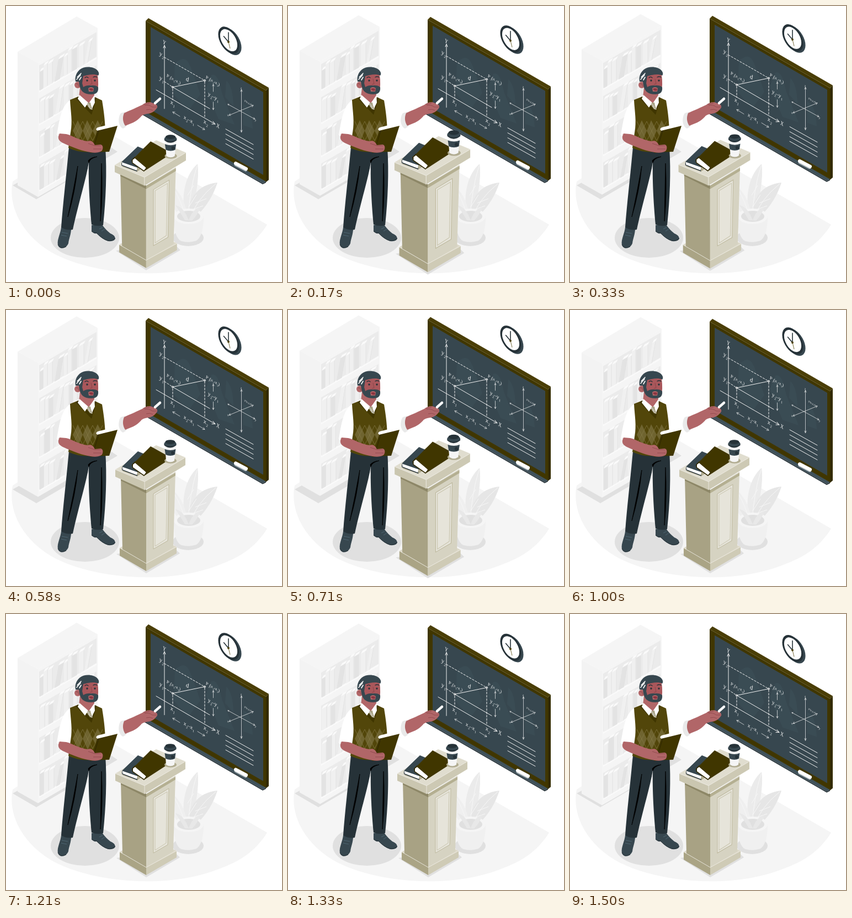
Animation of 500 by 500 pixels, one loop 1.54 s. Source, as an HTML page:

```html
<!DOCTYPE html>
<html lang="en">
<head>
<meta charset="utf-8">
<title>Geometry lesson</title>
<style>
  html, body { margin: 0; width: 100%; height: 100%; overflow: hidden; background: #fff; }
  svg { display: block; width: 100vw; height: 100vh; }
  .chalk { fill: none; stroke: #f2f2f2; stroke-width: 1; stroke-linecap: round; stroke-linejoin: round; }
  .dash { stroke-dasharray: 3.5 2.5; }
  .thin { stroke-width: .7; }
  .label { fill: #f5f5f5; font-family: "Liberation Serif", "Noto Serif", serif; font-style: italic; }
</style>
</head>
<body>
<svg viewBox="0 0 500 500">
  <!-- floor and soft shadows -->
  <path fill="#f5f5f5" d="M473 396 165 218 12 318C3 364 30 415 82 446 150 485 290 501 388 461 430 446 456 424 473 396Z"/>
  <path fill="#e0e0e0" d="M12 325 55 350 202 264 166 240Z"/>
  <ellipse cx="143" cy="420" rx="62" ry="36" fill="#e0e0e0"/>
  <ellipse cx="330" cy="420" rx="28" ry="15" fill="#e0e0e0"/>

  <g class="float">
    <path fill="#f5f5f5" d="M21 83 128 19 166 40 58 103Z"/>
    <path fill="#f3f3f3" d="M21 83 58 103V346L21 325Z"/>
    <path fill="#f5f5f5" d="M58 103 166 40V283L58 346Z"/>
    <g id="shelf" transform="matrix(1 -.583 0 1 58 103)"></g>
  </g>

  <!-- plant -->
  <g fill="#ebebeb">
    <path d="M326 385C315 345 325 305 347 286 351 310 343 355 333 385Z"/>
    <path fill="#e6e6e6" d="M329 388C328 350 347 323 383 320 374 347 362 365 338 388Z"/>
    <path fill="#efefef" d="M322 388C303 372 292 346 302 326 319 341 329 365 328 388Z"/>
    <path fill="none" stroke="#f7f7f7" d="M330 385Q333 330 346 290M332 387Q345 350 380 322M326 386Q319 355 303 330M329 343 340 325M331 364 345 342M343 357 363 349M337 369 357 362"/>
    <path fill="#f0f0f0" d="M304 381C303 405 309 423 318 426Q331 430 345 425C354 419 358 402 358 381Z"/>
    <ellipse cx="331" cy="381" rx="27" ry="14" fill="#f5f5f5"/>
    <ellipse cx="331" cy="381" rx="21" ry="10" fill="#e0e0e0"/>
    <path fill="#e8e8e8" d="M324 388Q313 370 307 361 322 364 331 388Q337 369 352 364 348 378 337 389Z"/>
  </g>

  <g class="float">
    <!-- blackboard -->
    <path fill="#4a3e06" d="M253 27 258 22 476 148 471 153Z"/>
    <path fill="#332b00" d="M471 153 476 148V315L471 319Z"/>
    <path fill="#403600" d="M253 27 471 153V319L253 193Z"/>
    <path fill="#37474f" d="M262 38 466 156V306L262 188Z"/>
    <g fill="#455a64" opacity=".28">
      <path d="M306 104C325 88 330 98 338 120L352 160 330 190 304 160Z"/>
      <path d="M372 125C383 121 387 140 392 160L414 215 385 205 362 150Z"/>
      <path d="M399 135Q411 145 412 181L397 165ZM430 178Q444 180 447 222L430 216Z"/>
    </g>
    <path fill="#3f515a" d="M247 195 253 192 471 318 465 321Z"/>
    <path fill="#263238" d="M247 195 465 321 471 318V320L465 323 247 197Z"/>
    <path stroke="#b8c0c4" stroke-width="7" stroke-linecap="round" d="M417 287 434 296"/>
    <path stroke="#fff" stroke-width="6" stroke-linecap="round" d="M416 285 435 295"/>

    <g class="chalk">
      <path d="M287 186V72M285 76 287 71 289 76M272 152 379 214M375 209 379 214 373 214M302 147 360 135M302 147 369 186"/>
      <path class="dash" d="M287 93 360 135M287 137 302 147M302 150V170M360 137V202"/>
      <circle cx="302" cy="147" r="1.6"/><circle cx="360" cy="135" r="1.6"/>
      <path class="thin" d="M375.500 155V142M374 145 375.500 142 377 145M375.500 174V188M374 185 375.500 188 377 185M315 200 302 192M304 195.500 302 192 306 192M347 216 360 224M356 224 360 224 358 220.500"/>
      <path class="thin" d="M426.500 152V228M425 155 426.500 151 428 155M425 225 426.500 229 428 225M402 178 451 205M404 178 402 178 403 180M449 202 451 205 448 205M404 198 448 180M406 195 404 198 407 198M445 179.500 448 180 446 183"/>
      <path d="M398 223 448 251M398 232 448 260M398 241 448 269M398 249.500 448 277.500"/>
    </g>
    <g id="labels" class="label"></g>

    <!-- clock -->
    <g id="clock">
      <g transform="matrix(.866 .5 0 1 407.500 64.500)"><circle r="22" fill="#37474f"/></g>
      <g transform="matrix(.866 .5 0 1 403.500 62)"><circle r="22" fill="#263238"/><circle r="18" fill="#fff"/></g>
      <path fill="none" stroke="#263238" stroke-width="1.600" stroke-linecap="round" d="M403 48V65L394.500 55"/>
      <path stroke="#52460a" stroke-width=".8" d="M403 65 406 77"/>
      <circle cx="403" cy="65" r="2" fill="#52460a"/>
    </g>
  </g>

  <!-- teacher -->
  <g id="teacher">
    <path fill="#37474f" d="M100 401C99 412 92 423 94 433 97 442 109 440 113 430 114 421 118 414 118 403ZM155 397V408Q159 413 164 412 175 423 185 426 197 427 198 421 197 415 189 412 180 405 174 396Z"/>
    <path fill="none" stroke="#263238" d="M94 432Q98 441 109 436M155 408Q159 412 164 411 174 422 184 425 193 426 198 421"/>
    <path fill="none" stroke="#546e7a" stroke-width=".8" d="M101 410 112 412M100 415 110 417M169 404 175 401M173 408 179 404"/>
    <path fill="#263238" d="M114 256C109 310 103 360 100 401Q110 407 121 405C132 355 146 310 150 283 149 320 152 365 155 396Q166 400 176 397C181 350 183 300 180 256Z"/>
    <path d="M130 290Q126 335 112 382 122 335 130 290ZM173 285Q176 340 171 390 172 335 173 285ZM150 284Q152 276 165 273 154 274 149 280Z" stroke="#000" stroke-width=".8"/>
    <path fill="#fff" d="M168 166C185 174 196 191 207 197L215 219C199 224 184 207 177 194Z"/>
    <path fill="#e9e9e9" d="M208 194C202 203 203 218 212 222 218 219 222 214 221 210L216 192Z"/>
    <path fill="#b16668" d="M214 194C227 188 237 184 247 179 253 174 262 173 266 176 272 177 275 180 274 184 270 190 267 192 262 194 256 196 248 195 244 201 236 210 226 213 216 217 211 209 211 201 214 194Z"/>
    <path fill="none" stroke="#8b4549" stroke-width=".8" d="M251 180Q259 178 265 183L273 183M254 188Q261 186 266 189M249 178 260 176"/>
    <path stroke="#fff" stroke-width="4.500" stroke-linecap="round" d="M270 176 279 168"/>

    <path fill="#fff" d="M134 161 120 168C103 177 98 195 92 234Q104 243 126 240L177 211 163 165Z"/>
    <path fill="none" stroke="#e0e0e0" d="M120 184Q121 206 116 235M94 232Q105 239 119 235"/>
    <path fill="#52460a" d="M131 164 116 170C117 191 121 209 117 230L113 257Q142 271 178 259C183 225 177 190 174 171L161 165 156 189Z"/>
    <path fill="#403600" d="M131 164 126 167 155 197 164 167 161 165 156 188Z"/>
    <g fill="#6f6430">
      <path d="M130 207 139 226 131 245 121 226ZM147 207 157 226 148 246 139 226ZM166 207 176 226 167 245 157 226Z"/>
      <path fill="none" stroke="#857a48" stroke-width=".7" d="M121 209 139 244 157 209 175 243M121 243 139 209 157 244 175 209"/>
    </g>
    <path fill="#b16668" d="M134 148 132 165 149 179 160 162 159 154Z"/>
    <path fill="#fff" d="M133 161 130 168 143 184 149 175ZM160 162 161 175 155 187 150 176Z"/>
    <path fill="#a8a284" d="M148 175 153 175 154 180 157 188 152 187 147 180Z"/>
    <path stroke="#e0e0e0" d="M148 177 153 183M149 181 155 187"/>

    <path fill="#a9575b" d="M134 123Q141 115 158 116 167 119 167 137 168 157 158 160 139 159 134 146Z"/>
    <circle cx="130" cy="143" r="6" fill="#b16668"/>
    <path fill="none" stroke="#8b4549" d="M127 141Q132 140 132 146"/>
    <path fill="#37474f" d="M126 137C124 127 129 119 134 115 143 108 159 110 165 116 169 120 169 124 167 126 159 122 148 125 140 127L138 140 140 147Q146 143 154 144 162 143 167 147C168 157 163 160 154 160 142 160 135 155 133 143L132 137Z"/>
    <path fill="none" stroke="#f5f5f5" stroke-width="1.700" stroke-linecap="round" d="M128 133 135 125M129 129 136 122M133 134 136 129"/>
    <path fill="#b16668" d="M149 149Q154 145 159 149L158 155H150Z"/>
    <path fill="#8b3440" d="M150 150Q154 148 158 150L157 154 152 153Z"/>
    <path fill="none" stroke="#263238" stroke-width="1.300" stroke-linecap="round" d="M143 130Q146 127 149 130M158 129Q161 127 165 129"/>
    <path fill="none" stroke="#8b4549" d="M154 132 156 141 152 142"/>
    <circle cx="147" cy="135" r="1.700" fill="#263238"/><circle cx="161" cy="135" r="1.700" fill="#263238"/>

    <path fill="#fff" d="M163 223 166 220 194 213 197 218 166 227Z"/>
    <path fill="#403600" d="M165 226 202 217 187 264Q170 264 152 266Z"/>
    <path fill="none" stroke="#2e2600" d="M168 226 156 265"/>
    <path fill="#b16668" d="M97 231C92 240 96 245 105 249 123 257 139 263 153 265 161 267 171 265 174 262 177 256 175 251 171 251L161 252C158 245 153 243 148 245 134 244 119 234 109 232Z"/>
    <path fill="none" stroke="#8b4549" stroke-width=".8" d="M149 249 161 253 172 253M158 259H173"/>
  </g>

  <g id="podium">
    <path fill="#e0e0e0" d="M200 442 254 477 315 441 300 426Z"/>
    <path fill="#ddd9c9" d="M206 431 254 403 309 429 254 459Z"/>
    <path fill="#aaa485" d="M206 431 254 459V473L206 445Z"/>
    <path fill="#cfcbb6" d="M254 459 309 429V441L254 473Z"/>
    <path fill="#a8a284" d="M208 302 254 326V459L211 434Z"/>
    <path fill="#d6d3c2" d="M254 326 307 293 303 430 254 459Z"/>
    <path fill="#e6e4da" stroke="#bdb89d" d="M267 333 295 316 293 418 267 433Z"/>
    <path fill="none" stroke="#c8c4ad" d="M270 335 292 322 290 415 270 428Z"/>
    <path fill="#8d8767" d="M208 306 254 326V332L208 309Z"/>
    <path fill="#b4af91" d="M254 326 307 295V300L254 332Z"/>
    <path fill="#e0ddcf" d="M198 289 272 245 325 267 251 311Z"/>
    <path fill="#cac6b0" d="M198 289 251 311V326L198 302Z"/>
    <path fill="#cdc9b4" d="M251 311 325 267V281L251 326Z"/>
    <path fill="none" stroke="#f0eee6" stroke-width=".8" d="M198 289 251 311 325 267M251 311V326M206 431 254 459 309 429"/>

    <path fill="#b1ac91" d="M211 292 238 301 257 288 250 266Z"/>
    <path fill="#263238" d="M210 285 237 296 238 301 210 290Z"/>
    <path fill="#fff" d="M211 284 238 293 237 299 211 289Z"/>
    <path fill="#37474f" d="M210 284 239 256 265 267 239 294Z"/>
    <path fill="#2e2600" d="M228 280 234 274 256 295 250 301 229 286Z"/>
    <path fill="#fff" d="M230 280 234 277 254 294 250 299 230 285Z"/>
    <path fill="#403600" d="M233 276 262 247 289 262Q292 268 291 274L251 300Q255 296 253 293Z"/>

    <ellipse cx="298" cy="273" rx="11" ry="5" fill="#b1ac91"/>
    <path fill="#f5f5f5" d="M288 246 290 273Q298 278 305 273L308 246Z"/>
    <path fill="#37474f" d="M287.500 252 289 262Q298 266 306 262L307.500 252Q298 256 287.500 252Z"/>
    <circle cx="302" cy="259" r="3" fill="#263238"/>
    <path fill="#263238" d="M286.500 242V245Q297 254 308.500 245V242Z"/>
    <ellipse cx="297.500" cy="242" rx="11" ry="5" fill="#37474f"/>
    <ellipse cx="297.500" cy="239" rx="9" ry="3.800" fill="#263238"/>
  </g>
</svg>
<script>
  const byId = id => document.getElementById(id);

  // Shelves, drawn flat and sheared by the group's matrix
  const poly = (points, fill) => `<polygon points="${points}" fill="${fill}"/>`;
  const rect = (x, y, w, h, fill) => `<rect x="${x}" y="${y}" width="${w}" height="${h}" fill="${fill}"/>`;
  let shelf = "";
  for (let row = 0; row < 4; row++) {
    const top = 6 + row * 60, bottom = top + 49;
    shelf += rect(2, top, 104, 49, "#ebebeb") + rect(2, bottom - 4, 104, 4, "#fafafa");
    for (let i = 0, x = 3; x < 98; i++) {
      const width = 6 + (i * 5 + row * 3) % 4, height = 37 + (i * 7 + row * 5) % 9;
      const lean = i % 5 === 3 ? 7 : 0, y = bottom - height, base = bottom - 3;
      const gray = (i + row) % 3 ? "#f0f0f0" : "#e3e3e3";
      shelf += poly([x, base, x + lean, y, x + lean + width, y, x + width, base], gray)
        + poly([x + lean, y, x + lean + 3, y - 4, x + lean + width + 3, y - 4, x + lean + width, y], "#fafafa")
        + `<path d="M${x + width} ${base}L${x + width + lean} ${y}" stroke="#e0e0e0" stroke-width=".8"/>`;
      x += width + lean + (i % 4 === 2 ? 4 : 1);
    }
  }
  byId("shelf").innerHTML = shelf;

  // "_n" in a label becomes a subscript
  const labels = [
    ["Y", 284, 68, 11], ["X", 381, 219, 11], ["d", 326, 135, 12],
    ["y_2", 278, 89, 12], ["y_1", 278, 133, 12], ["x_1", 298, 177, 12], ["x_2", 358, 212, 12],
    ["y_2–y_1", 366, 162, 11], ["x_2–x_1", 322, 204, 11],
    ["P_1(x_1-x_1)", 291, 128, 8.5], ["P_2(x_2-x_2)", 362, 131, 8.5],
    ["P(x,y,z)", 432, 173, 5], ["x", 401, 199, 6], ["y", 451, 208, 6], ["z", 425, 150, 6]
  ];
  byId("labels").innerHTML = labels.map(([text, x, y, size]) => {
    const small = size * .6, drop = size * .3;
    const body = text.replace(/_(\d)([^_]?)/g, (_, n, next) =>
      `<tspan font-size="${small}" dy="${drop}">${n}</tspan>` + (next && `<tspan dy="${-drop}">${next}</tspan>`));
    return `<text font-size="${size}" transform="matrix(.866 .5 0 1 ${x} ${y})">${body}</text>`;
  }).join("");

  const LOOP = 1540, LEAD = 40;
  const floating = document.querySelectorAll(".float"), podium = byId("podium");

  // Linear rise and fall between three times
  const beat = (t, start, peak, end) =>
    Math.max(0, Math.min((t - start) / (peak - start), (end - t) / (end - peak)));

  function draw(now) {
    const t = (now + LEAD) % LOOP;
    const lift = 10 * beat(t, 0, LOOP / 2, LOOP);
    const scale = 1 + .082 * (beat(t, 0, 215, 430) + beat(t, 640, 760, 900));
    for (const part of floating) part.setAttribute("transform", `translate(0 ${.5 - lift})`);
    podium.setAttribute("transform", `translate(261.5 359) scale(${scale}) translate(-261.5 -359)`);
  }

  const start = performance.now();
  function tick() {
    draw(performance.now() - start);
    requestAnimationFrame(tick);
  }
  draw(0);
  requestAnimationFrame(tick);
</script>
</body>
</html>
```
